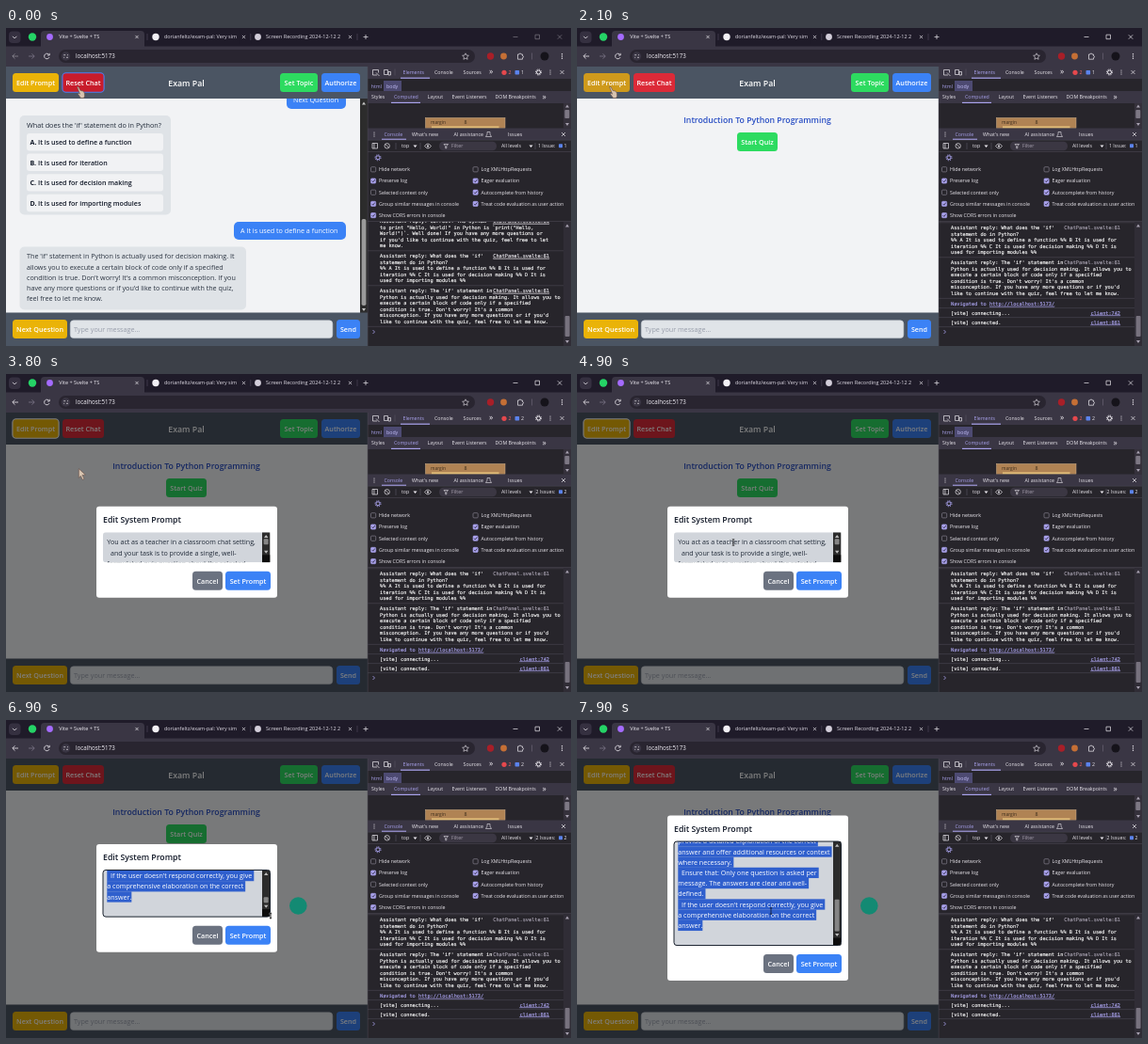
Write an HTML page that moves like this. It is 600x338 px and loops after 8 s.

```html
<!DOCTYPE html>
<html lang="en">
<head>
<meta charset="utf-8">
<title>Quiz screen</title>
<style>
html, body { margin: 0; width: 100%; height: 100%; overflow: hidden; background: #1f1b29; }
svg { display: block; }
text { font-family: "Open Sans", "Noto Sans", sans-serif; white-space: pre; }
.mono { font-family: "DejaVu Sans Mono", "Liberation Mono", monospace; stroke-width: 0.14px; }
.u { text-decoration: underline; }
</style>
</head>
<body>
<script>
const NS = 'http://www.w3.org/2000/svg';
const LOOP = 8000, STEP = 100;

function add(parent, tag, attrs = {}, content) {
  const node = document.createElementNS(NS, tag);
  set(node, attrs);
  if (content !== undefined) node.textContent = content;
  parent.appendChild(node);
  return node;
}
function set(node, attrs) {
  for (const key in attrs) node.setAttribute(key, attrs[key]);
}
const group = p => add(p, 'g');
const box = (p, x, y, width, height, fill, rx = 0, more = {}) =>
  add(p, 'rect', { x, y, width, height, fill, rx, ...more });
const dot = (p, cx, cy, r, fill) => add(p, 'circle', { cx, cy, r, fill });
const label = (p, x, y, str, size, fill, more = {}) =>
  add(p, 'text', { x, y, 'font-size': size, fill, ...more }, str);
const stroke = (p, d, color, width = 0.8, more = {}) =>
  add(p, 'path', { d, fill: 'none', stroke: color, 'stroke-width': width, ...more });
const show = (node, on) => node.setAttribute('display', on ? 'inline' : 'none');

const BOLD = { 'font-weight': 600 };
const MID = { ...BOLD, 'text-anchor': 'middle' };
const GREY = '#4b5563', PAGE = '#f2f3f5', CARD = '#dfe3e7';
const BLUE = '#3b82f6', GREEN = '#2ddb60', YELLOW = '#eab308', RED = '#dc2a38';
const STRIP = '#1f1b29', BAR = '#3a3644', PANEL = '#27252b';
const PALE = '#ebe8ee', DIM = '#a7a1b0', LILAC = '#a9a2ec';

const stage = add(document.body, 'svg', { viewBox: '0 0 600 338', width: '100%', height: '100%' });

function button(p, x, y, w, str, fill) {
  const g = group(p);
  const face = box(g, x, y, w, 20, fill, 3.5);
  label(g, x + w / 2, y + 12.9, str, 7.2, '#fff', MID);
  return { g, face };
}

// Web page
const app = group(stage);
box(app, 0, 41, 384, 297, PAGE);

const chat = group(app);
box(chat, 298, 66, 63, 20, BLUE, 5);
label(chat, 305, 79.3, 'Next Question', 7.2, '#fff', { 'font-weight': 500 });
box(chat, 14.5, 93, 160.5, 105.5, CARD, 5);
label(chat, 22, 105.6, "What does the 'if' statement do in Python?", 7.25, '#1f2937', { 'font-weight': 500 });
['used to define a function', 'used for iteration', 'used for decision making', 'used for importing modules']
  .forEach((str, i) => {
    const y = 112 + i * 21.6;
    box(chat, 22, y, 145, 18.4, '#f1f2f4', 3);
    label(chat, 25.5, y + 11.9, 'ABCD'[i] + '.', 7.1, '#111827', { 'font-weight': 700 });
    label(chat, 34, y + 11.9, 'It is ' + str, 7.1, '#111827', BOLD);
  });
box(chat, 242, 206, 119, 19, BLUE, 5);
label(chat, 249, 218, 'A It is used to define a function', 7.2, '#fff', { 'font-weight': 500 });
box(chat, 14.5, 232.5, 240.5, 67, CARD, 5);
["The 'if' statement in Python is actually used for decision making. It",
  'allows you to execute a certain block of code only if a specified',
  "condition is true. Don't worry! It's a common misconception. If you",
  "have any more questions or if you'd like to continue with the quiz,",
  'feel free to let me know.'
].forEach((str, i) => label(chat, 22, 245.4 + i * 11.1, str, 7.2, '#2a3340'));
box(chat, 376, 75, 8, 228, '#2c2c2c');
box(chat, 377.6, 203, 4.8, 92, '#9a9a9a', 1.8);
add(chat, 'path', { d: 'M378 81.5l2-3 2 3zM378 298l2 3 2-3z', fill: '#c4c4c4' });

const intro = group(app);
label(intro, 191.5, 100.9, 'Introduction To Python Programming', 8.75, '#2a4fc4', MID);
button(intro, 170, 111, 43, 'Start Quiz', GREEN);

box(app, 0, 41, 384, 34, GREY);
box(app, 0, 302.5, 384, 35.5, GREY);
const edit = button(app, 7, 48, 49, 'Edit Prompt', YELLOW);
const reset = button(app, 60, 48, 44, 'Reset Chat', RED);
label(app, 191.5, 61.6, 'Exam Pal', 8.75, '#fff', MID);
button(app, 291, 48, 40, 'Set Topic', GREEN);
button(app, 335, 48, 41, 'Authorize', BLUE);
button(app, 7, 310, 58, 'Next Question', YELLOW);
box(app, 68.3, 310.8, 278.5, 18.8, '#e0e4e8', 3.5, { stroke: '#cdd2d8', 'stroke-width': 0.6 });
label(app, 72, 323, 'Type your message...', 7.2, '#979daa');
button(app, 351, 310, 25, 'Send', BLUE);
const ring = (x, w, color) => box(app, x, 47.8, w, 20.4, 'none', 3.8, { stroke: color, 'stroke-width': 1.1 });
const resetBlue = ring(59.9, 44.2, '#4f7df0');
const resetWhite = ring(59.9, 44.2, '#fff');
const editRing = ring(6.9, 49.2, '#fff');

// Dialog
const dialog = group(stage);
box(dialog, 0, 41, 384, 297, '#000', 0, { opacity: 0.5 });
const sheet = box(dialog, 96, 0, 192, 97, '#fff', 3);
const heading = label(dialog, 103, 0, 'Edit System Prompt', 8.75, '#111827', BOLD);
const area = add(dialog, 'svg', { x: 103, width: 177.5, overflow: 'hidden' });
const areaBack = box(area, 0, 0, 177.5, 32, '#d1d5db', 3);
const HEAD = ['You act as a teacher in a classroom chat setting,',
  '  and your task is to provide a single, well-', 'formulated quiz question about the selected'];
const TAIL = ['If the user answers wrongly, you must then', 'provide a detailed explanation of the correct',
  'answer and offer additional resources or context', 'where necessary.',
  '  Ensure that: Only one question is asked per', 'message. The answers are clear and well-',
  'defined.', "  If the user doesn't respond correctly, you give", 'a comprehensive elaboration on the correct', 'answer.'];
const LEAD = 11.2;
const headText = group(area), tailText = group(area);
HEAD.forEach((str, i) => label(headText, 4.3, 13.2 + i * LEAD, str, 7.12, '#1f2937'));
TAIL.forEach((str, i) => {
  const y = (i - TAIL.length + 1) * LEAD;
  const mark = box(tailText, 4.3, y - 8.2, 0, LEAD + 0.1, '#2f5fcd');
  const line = label(tailText, 4.3, y, str, 7.12, '#fff');
  mark.setAttribute('width', line.getComputedTextLength() + (i < TAIL.length - 1 ? 2 : 0));
});
const track = box(area, 169, 0, 8.5, 32, '#2b2b2b');
const thumb = box(area, 170.6, 7, 5, 8, '#858585', 1);
add(area, 'path', { d: 'M171 5.6l2.2-3 2.2 3z', fill: '#bbb' });
const down = add(area, 'path', { d: 'M171 0l2.2 3 2.2-3z', fill: '#bbb' });
const grip = box(area, 169, 0, 8.5, 8, '#0c0c0c');
const focus = box(dialog, 103, 0, 177.5, 32, 'none', 3, { stroke: '#18202c', 'stroke-width': 1 });
const actions = group(dialog);
button(actions, 198, 0, 32, 'Cancel', '#6b7280');
button(actions, 233, 0, 48, 'Set Prompt', BLUE);
const badge = dot(dialog, 310.3, 197.5, 9.3, '#138a73');

// Console output
const tools = group(stage);
box(tools, 384, 41, 216, 297, PANEL);
const log = group(tools);
const mono = (p, x, y, str, fill = '#fafafa', more = {}) =>
  label(p, x, y + 1.9, str, 5.23, fill, { class: 'mono', stroke: fill, ...more });
const rule = (p, y) => stroke(p, `M384 ${y}H592`, '#4b4753', 0.6);
const links = [];
function entry(y, lines) {
  lines.forEach((str, i) => mono(log, 397, y + i * 6.63, str));
  links.push(mono(log, 577, y, 'ChatPanel.svelte:61', DIM, { 'text-anchor': 'end' }));
  rule(log, y + lines.length * 6.63 - 1.4);
}
entry(175, ['Assistant reply: Correct! The syntax', 'to print "Hello, World!" in Python is `print("Hello,',
  'World!")`. Well done! If you have any more questions or', "if you'd like to continue with the quiz, feel free to let", 'me know.']);
entry(212, ["Assistant reply: What does the 'if'", 'statement do in Python?',
  '%% A It is used to define a function %% B It is used for',
  'iteration %% C It is used for decision making %% D It is', 'used for importing modules %%']);
entry(249, ["Assistant reply: The 'if' statement in", 'Python is actually used for decision making. It allows you to',
  'execute a certain block of code only if a specified', "condition is true. Don't worry! It's a common",
  "misconception. If you have any more questions or if you'd",
  'like to continue with the quiz, feel free to let me know.']);
const news = group(log);
mono(news, 397, 293, 'Navigated to ', LILAC);
mono(news, 438, 293, 'http://localhost:5173/', LILAC, { class: 'mono u' });
[['[vite] connecting...', 'client:742', 302.6], ['[vite] connected.', 'client:861', 312.6]].forEach(([str, src, y]) => {
  rule(news, y - 5);
  mono(news, 397, y, str);
  mono(news, 577, y, src, LILAC, { class: 'mono u', 'text-anchor': 'end' });
});
rule(news, 317.6);
stroke(tools, 'M389.5 321l2 2-2 2', LILAC);
box(tools, 592, 206, 8, 132, '#302d36');
box(tools, 593.6, 306, 5, 22, '#77727e', 1);
add(tools, 'path', { d: 'M594 211.5l2-3 2 3zM594 332l2 3 2-3z', fill: DIM });

// Developer panel
const ui = (x, y, str, fill = PALE, more) => label(tools, x, y + 1.9, str, 5.25, fill, more);
const more = (x, y) => label(tools, x, y + 2.3, '»', 8.5, PALE);
box(tools, 384, 41, 216, 165, PANEL);
box(tools, 384, 41, 216, 13, BAR);
stroke(tools, 'M394 50h-4.5v-5.5h6v3M393 47.5l3.5 3.5M401.5 44.5h4v5h-4zM406 46.5h2.5v3.5h-2.5z', PALE, 0.7);
stroke(tools, 'M413 43.5v7', '#5d5866', 0.6);
ui(421.5, 47, 'Elements', LILAC);
ui(455, 47, 'Console');
ui(485.5, 47, 'Sources');
more(513, 47);
box(tools, 419, 52.6, 31, 1.2, LILAC);
const errors = group(tools);
dot(errors, 529, 47.3, 2.6, '#e5484d');
label(errors, 533.5, 49.2, '2', 5.25, '#ee6a6a');
const issueTag = group(tools);
box(issueTag, 540.5, 45, 4.6, 4.6, '#5b83ee', 0.8);
const issueNum = label(issueTag, 547, 49.2, '1', 5.25, PALE);
function gear(x, y, color) {
  stroke(tools, `M${x - 2} ${y}a2 2 0 1 0 4 0a2 2 0 1 0-4 0`, color, 1);
  add(tools, 'circle', { cx: x, cy: y, r: 3, fill: 'none', stroke: color, 'stroke-width': 1, 'stroke-dasharray': '1.2 1.15' });
}
gear(565.5, 47, PALE);
[-2, 0, 2].forEach(d => dot(tools, 578, 47 + d, 0.6, PALE));
const cross = (p, x, y, r = 2, color = PALE) =>
  stroke(p, `M${x - r} ${y - r}l${2 * r} ${2 * r}M${x + r} ${y - r}l${-2 * r} ${2 * r}`, color, 0.7);
cross(tools, 590.5, 47);
ui(387.7, 61.7, 'html', LILAC);
box(tools, 401, 56, 19, 11, '#4d4a72');
ui(404, 61.7, 'body', '#c5c0fa');
box(tools, 384, 67, 216, 13, BAR);
[[388, 'Styles'], [412, 'Computed'], [447.5, 'Layout'], [473.5, 'Event Listeners'], [519.5, 'DOM Breakpoints']]
  .forEach(([x, str], i) => ui(x, 73.2, str, i === 1 ? LILAC : PALE));
more(569.5, 73.2);
box(tools, 409, 78.8, 31, 1.2, LILAC);
box(tools, 445.5, 95.5, 84.5, 11, '#b08354', 0, { stroke: '#d5b48c', 'stroke-width': 0.5 });
ui(451, 100, 'margin', '#3a2b1a', { 'font-size': 4.8 });
ui(486.5, 100, '8', '#3a2b1a');
box(tools, 452, 104.4, 71.5, 2, '#e1bd79');
box(tools, 592, 80, 8, 26.5, '#35313b');
box(tools, 593.3, 87, 5, 9, '#7d7884', 1);
add(tools, 'path', { d: 'M594 84.5l2-3 2 3zM594 101l2 3 2-3z', fill: DIM });
box(tools, 384, 106.5, 216, 12.5, BAR);
[-2, 0, 2].forEach(d => dot(tools, 391, 113 + d, 0.6, PALE));
[[401.5, 'Console'], [431, "What's new"], [475.5, 'AI assistance'], [533, 'Issues']]
  .forEach(([x, str], i) => ui(x, 113, str, i ? PALE : LILAC));
stroke(tools, 'M511 110.5h3v2.5l1.5 2.5h-6l1.5-2.5z', PALE, 0.6);
box(tools, 399, 117.7, 26, 1.2, LILAC);
cross(tools, 592, 113);
stroke(tools, 'M384 131.5H600M384 119.2H600M384 205.5H600', '#4b4753', 0.6);
stroke(tools, 'M389 122.5h5.5v5.5h-5.5zM391 122.5v5.5M402 125.3a2.7 2.7 0 1 0 5.4 0a2.7 2.7 0 1 0-5.4 0M402.8 123.4l3.8 3.8', PALE, 0.7);
ui(420, 125.4, 'top');
add(tools, 'path', { d: 'M432.5 124.4h4l-2 2.5zM555.5 124.4h4l-2 2.5z', fill: PALE });
stroke(tools, 'M414 122v7M440 122v7M562 122v7', '#5d5866', 0.6);
stroke(tools, 'M444.5 125.5q3.5-4.8 7 0q-3.5 4.8-7 0z', PALE, 0.7);
dot(tools, 448, 125.5, 1.1, PALE);
box(tools, 460, 120.8, 61, 9.4, '#3b3743', 4.5);
stroke(tools, 'M465 123.5h4.5l-1.7 2v2.3h-1.1v-2.3z', PALE, 0.6);
ui(473, 125.4, 'Filter', DIM);
ui(526, 125.4, 'All levels');
const issues = ui(565, 125.4, '');
const issueIcon = box(tools, 587, 123.2, 4, 4, '#5b83ee', 0.7);
const issueCount = ui(592.5, 125.4, '');
gear(395, 137.8, LILAC);
function check(x, y, str, on) {
  box(tools, x, y - 2.6, 5.2, 5.2, on ? LILAC : 'none', 1, { stroke: on ? LILAC : '#938d9d', 'stroke-width': 0.6 });
  if (on) stroke(tools, `M${x + 1.1} ${y}l1.2 1.3 2-2.7`, '#27233a', 0.8);
  ui(x + 8.5, y, str);
}
[['Hide network', 0, 'Log XMLHttpRequests', 0], ['Preserve log', 1, 'Eager evaluation', 1],
  ['Selected context only', 0, 'Autocomplete from history', 1],
  ['Group similar messages in console', 1, 'Treat code evaluation as user action', 1], ['Show CORS errors in console', 1]]
  .forEach(([left, l, right, r], i) => {
    const y = 150.3 + i * 12.2;
    check(387.5, y, left, l);
    if (right) check(496, y, right, r);
  });
stroke(tools, 'M384.2 41V338', '#4b4753', 0.6);

// Browser frame
const frame = group(stage);
box(frame, 0, 0, 600, 41, STRIP);
box(frame, 0, 19.5, 600, 21.5, BAR);
box(frame, 37, 3, 110, 22, BAR, 4);
box(frame, 3, 3.5, 12.5, 12.5, '#353040', 4);
stroke(frame, 'M7 8.8l2.2 2.2 2.2-2.2', PALE);
dot(frame, 28, 9.5, 4.2, '#25d366');
const icon = dot(frame, 46.5, 9.5, 3.4, '#a56bff');
const spinner = stroke(frame, 'M46.5 6.3a3.2 3.2 0 1 0 3.2 3.2', '#b9b0dc', 1);
label(frame, 56.3, 11.4, 'Vite + Svelte + TS', 5.5, '#f1eef5');
dot(frame, 159, 9.5, 3.7, '#f2f0f5');
label(frame, 168, 11.4, 'dorianfeltz/exam-pal: Very sim', 5.45, '#e2dee8');
box(frame, 247.5, 2, 13, 15, STRIP);
dot(frame, 267.5, 9.5, 3.4, '#d3ceda');
label(frame, 276, 11.4, 'Screen Recording 2024-12-12 2', 5.5, '#e2dee8');
box(frame, 362, 2, 13, 15, STRIP);
[139, 252.5, 365.5].forEach(x => cross(frame, x, 9.5, 1.6));
stroke(frame, 'M150 6v7M259.8 6v7M373 6v7', '#575063', 0.6);
stroke(frame, 'M379.5 9.5h5M382 7v5', PALE, 0.7);
const controls = group(frame);
stroke(controls, 'M538.5 9.5h5M562 7.2h4.5v4.5h-4.5z', PALE, 0.7);
cross(controls, 588, 9.5, 2.2);
stroke(controls, 'M13 30h-6M9.5 27.3l-2.7 2.7 2.7 2.7', PALE);
stroke(frame, 'M24 30h6M27.5 27.3l2.7 2.7-2.7 2.7', '#7d7788');
const reload = stroke(frame, 'M45.8 28.5a2.8 2.8 0 1 0 .2 2.6M46.2 26.8v2.2h-2.2', PALE);
const stop = cross(frame, 43.5, 30, 2.3);
box(frame, 56, 23, 442, 14, '#292530', 7);
dot(frame, 63.5, 30, 4.7, BAR);
stroke(frame, 'M61.2 28.7h2M65 28.7h1M61.2 31.3h1M64 31.3h2', PALE, 0.7);
label(frame, 74, 32.2, 'localhost:5173', 6.2, '#f1eef5');
stroke(frame, 'M488 26.8l1 2.2 2.4.3-1.8 1.6.5 2.4-2.1-1.2-2.1 1.2.5-2.4-1.8-1.6 2.4-.3z', PALE, 0.6);
dot(frame, 514.5, 30, 3.7, '#a81f28');
dot(frame, 528.5, 30, 3.4, '#c56f35');
stroke(frame, 'M543.5 28h1.5a1 1 0 0 1 2 0h1.5v1.6a1 1 0 0 1 0 2v1.6h-5z', PALE, 0.7);
stroke(frame, 'M558.5 26.5v7', '#6a6375', 0.7);
dot(frame, 572, 30, 4.5, '#15131a');
[-2.2, 0, 2.2].forEach(d => dot(frame, 590.5, 30 + d, 0.7, PALE));

// Pointers, each with its hot spot at the origin
const pointers = {};
const pointer = (name, d, fill, edge, width) =>
  pointers[name] = add(stage, 'path', { d, fill, stroke: edge, 'stroke-width': width, 'stroke-linejoin': 'round' });
pointer('hand', 'M-1.5-.5l1.5 0 2 4 2.800.5 1.5 2 .2 3.500-1 2h-3l-3.2-4.5 1-.8 1.2 1z', '#d8c4b0', '#6b5148', 0.6);
pointer('arrow', 'M0 0l7 6.5-3.3.3 2 4-1.8.9-1.9-4-2 2z', '#d8c4b0', '#6b5148', 0.6);
pointer('beam', 'M-1.3-3.2h2.6M0-3.2v6.4M-1.3 3.2h2.6', 'none', '#111', 0.7);
pointer('size', 'M0-4l1.6 2.2h-1v3.6h1l-1.6 2.2-1.6-2.2h1v-3.6h-1z', '#111', '#fff', 0.3);

const PATH = [[0, 77, 63], [500, 72, 63], [1000, 70, 63], [1300, 70, 63], [1800, 36, 63], [3500, 36, 63],
  [4400, 160, 176], [4900, 166, 179], [5400, 166, 179], [5800, 185, 187], [6300, 185, 187],
  [6700, 281, 199], [7300, 281, 226], [7500, 281, 238], [7600, 281, 238], [7900, 206, 203]];
const GROW = [[6700, 32], [7300, 85], [7500, 110.5]];

function sample(table, t) {
  const i = table.findIndex(row => row[0] > t);
  if (i === 0) return table[0].slice(1);
  if (i < 0) return table[table.length - 1].slice(1);
  const a = table[i - 1], b = table[i], k = (t - a[0]) / (b[0] - a[0]);
  return a.slice(1).map((v, n) => v + (b[n + 1] - v) * k);
}

function drawDialog(t) {
  const [h] = sample(GROW, t);
  const top = 189.3 - (h + 65) / 2, y = top + 27.5;
  const selected = t >= 5600;
  set(sheet, { y: top, height: h + 65 });
  set(heading, { y: top + 17.4 });
  set(area, { y, height: h });
  [areaBack, track].forEach(node => set(node, { height: h }));
  set(focus, { y, height: h });
  set(actions, { transform: `translate(0 ${top + h + 37})` });
  set(tailText, { transform: `translate(0 ${h - 18.6})` });
  set(grip, { y: h - 8 });
  set(down, { transform: `translate(0 ${h - 12.5})` });
  const room = h - 22, size = Math.max(6, room * h / 290);
  set(thumb, { y: 7 + (selected ? room - size : 0), height: size });
  show(headText, !selected);
  show(tailText, selected);
  show(focus, t >= 5300);
  show(badge, t >= 6600);
}

function draw(t) {
  const [x, y] = sample(PATH, t);
  const active = t >= 500, moved = t >= 900, fresh = t >= 1100, open = t >= 3500;
  const overReset = !open && x > 60, overEdit = !open && x < 56;
  const loading = t >= 800 && t < 1200;
  show(chat, !fresh);
  show(intro, fresh);
  set(reset.face, { fill: overReset ? '#c81c2b' : RED });
  set(edit.face, { fill: overEdit ? '#cf9a1c' : YELLOW });
  show(resetBlue, !active);
  show(resetWhite, active && !fresh);
  show(editRing, t >= 3300 && t < 5300);

  set(log, { transform: `translate(0 ${moved ? 0 : 30})` });
  show(news, moved);
  const tint = moved ? DIM : PALE;
  links.forEach(node => set(node, { class: moved ? 'mono' : 'mono u', fill: tint, stroke: tint }));
  const count = open ? 2 : moved && !fresh ? 0 : 1;
  set(errors, { transform: `translate(${count ? 0 : 15} 0)` });
  [issueTag, issueIcon, issueCount].forEach(node => show(node, count));
  issueNum.textContent = issueCount.textContent = count;
  issues.textContent = ['No Issues', '1 Issue:', '2 Issues:'][count];
  set(issues, { x: count === 2 ? 562.5 : count ? 565 : 567.5 });

  set(controls, { opacity: active ? 1 : 0.45 });
  show(reload, !loading);
  show(stop, loading);
  show(icon, !loading);
  show(spinner, loading);
  set(spinner, { transform: `rotate(${t * 0.4} 46.5 9.5)` });

  show(dialog, open);
  drawDialog(t);

  let kind = 'arrow';
  if (overReset || overEdit) kind = 'hand';
  else if (t >= 6600 && t <= 7600) kind = 'size';
  else if (open && x > 103 && x < 272 && y > 168) kind = 'beam';
  for (const name in pointers) show(pointers[name], name === kind);
  set(pointers[kind], { transform: `translate(${x} ${y})` });
}

const start = performance.now();
function tick() {
  const t = (performance.now() - start) % LOOP;
  draw(Math.floor(t / STEP) * STEP);
  requestAnimationFrame(tick);
}
tick();
</script>
</body>
</html>
```
